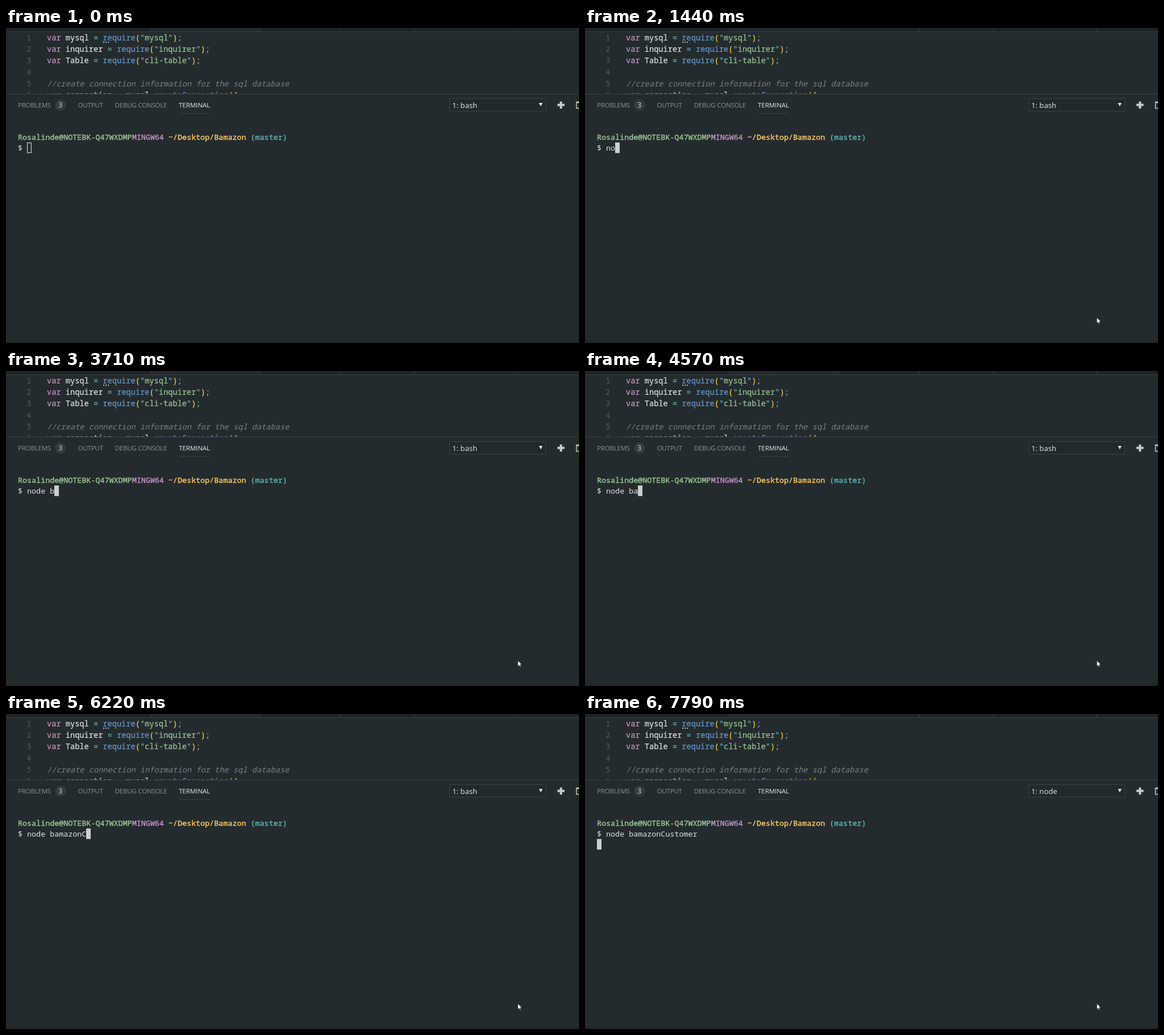
An HTML page that plays this animation: 1008x555 px, repeating every 8000 ms.

```html
<!DOCTYPE html>
<html lang="en">
<head>
<meta charset="utf-8">
<title>Terminal session</title>
<style>
  html, body { margin: 0; width: 100%; height: 100%; overflow: hidden; background: #242b2e; }
  svg { display: block; width: 1008px; height: 555px; }
  text { white-space: pre; }
  .code, .term { font-family: "Noto Sans Mono", "DejaVu Sans Mono", monospace; font-variant-ligatures: none; }
  .code { font-size: 13.67px; stroke-width: .2px; }
  .term { font-size: 13.39px; stroke-width: .4px; }
  .ui { font-family: "Open Sans", "Noto Sans", sans-serif; }
  .tab { font-size: 11.6px; letter-spacing: -.25px; fill: #899092; }
</style>
</head>
<body>
<svg viewBox="0 0 1008 555">
  <defs><clipPath id="pane"><rect y="7" width="1008" height="108.5"/></clipPath></defs>

  <rect width="1008" height="555" fill="#242b2e"/>
  <rect width="1008" height="6" fill="#1e2427"/>
  <rect x="254" width="193" height="6" fill="#242b2e"/>
  <path d="M254.5 0V6M446.5 0V6M588.5 0V6M718.5 0V6M900.5 0V6M0 6.5H1008" stroke="#363e42" fill="none"/>

  <g id="editor" class="code" clip-path="url(#pane)"></g>
  <g fill="#b4babb">
    <rect x="171" y="24" width="2" height="2"/>
    <rect x="175" y="24" width="2" height="2"/>
    <rect x="179" y="24" width="2" height="2"/>
  </g>

  <path d="M0 116.5H1008" stroke="#384044"/>
  <g class="ui tab">
    <text x="21" y="140">PROBLEMS</text>
    <text x="126.5" y="140">OUTPUT</text>
    <text x="191.5" y="140">DEBUG CONSOLE</text>
    <text x="304" y="140" style="fill:#e3e6e7;letter-spacing:-.1px">TERMINAL</text>
  </g>
  <circle cx="95.8" cy="135.7" r="9.6" fill="#363d40"/>
  <text class="ui" x="95.8" y="140" font-size="12" text-anchor="middle" fill="#d5d9da">3</text>
  <path d="M304 150.5H359" stroke="#394145"/>

  <rect x="780.5" y="124.5" width="169" height="22" fill="#22292c" stroke="#394145"/>
  <text id="shell" class="ui" x="785" y="141" font-size="13.1" fill="#e2e5e6"></text>
  <path d="M937.5 132H944L940.75 138Z" fill="#e2e5e6"/>
  <path d="M976.3 129.5V142M970 135.5H982.5" stroke="#c9cccd" stroke-width="4" fill="none"/>
  <path d="M1008 130.5H1003.5V141.5H1008" stroke="#c9cccd" stroke-width="1.4" fill="none"/>
  <path d="M1003 131H1008" stroke="#c9cccd" stroke-width="2.4"/>

  <g id="terminal" class="term"></g>
  <text id="command" class="term" x="21" y="215.6" fill="#dfe3e5"></text>
  <rect id="caret"/>
  <path id="mouse" d="M0 0V10L2.3 8L3.8 11.3L5.4 10.6L3.9 7.4L7 7.1Z" fill="#fff" stroke="#14181a" stroke-width=".6"/>
  <rect y="551" width="1008" height="4" fill="#20272a"/>
</svg>
<script>
const LOOP = 8000, LEFT = 21, CELL = 8.03;
const WHITE = "#dfe3e5", PURPLE = "#c594c5", TEAL = "#5fb3b3",
      BLUE = "#6699cc", GREEN = "#99c794", GOLD = "#fac863", BRACKET = "#ffd02e", GREY = "#778083";
const COMMAND = "node bamazonCustomer";

const $ = id => document.getElementById(id);

function el(parent, name, attrs, content = "") {
  const node = document.createElementNS("http://www.w3.org/2000/svg", name);
  for (const key in attrs) node.setAttribute(key, attrs[key]);
  node.textContent = content;
  return parent.appendChild(node);
}

// A thin stroke in the text colour gives the medium weight.
function textRuns(parent, x, y, runs) {
  const line = el(parent, "text", { x, y });
  for (const [str, fill, style = "normal"] of runs) {
    const stroke = style === "italic" ? "none" : fill;
    el(line, "tspan", { fill, stroke, "font-style": style }, str);
  }
}

const requireLine = (name, pkg) => [
  ["var ", PURPLE], [name, WHITE], [" = ", TEAL], ["require", BLUE], ["(", BRACKET],
  ['"', TEAL], [pkg, GREEN], ['"', TEAL], [")", BRACKET], [";", TEAL]
];

const lines = [
  requireLine("mysql", "mysql"),
  requireLine("inquirer", "inquirer"),
  requireLine("Table", "cli-table"),
  [],
  [["//create connection information for the sql database", GREY, "italic"]],
  [["var ", PURPLE], ["connection", WHITE], [" = ", TEAL], ["mysql", WHITE], [".", TEAL],
   ["createConnection", BLUE], ["({", BRACKET]]
];
lines.forEach((runs, i) => {
  const y = 21.6 + i * 20.35;
  el($("editor"), "text", { x: 44.5, y, "text-anchor": "end", fill: "#505a5e" }, i + 1);
  textRuns($("editor"), 72, y, runs);
});

textRuns($("terminal"), LEFT, 197.3, [
  ["Rosalinde@NOTEBK-Q47WXDMP", GREEN], ["MINGW64 ", PURPLE],
  ["~/Desktop/Bamazon ", GOLD], ["(master)", TEAL]
]);

// [time, characters typed]
const typing = [
  [0, 0], [1270, 1], [1440, 2], [1545, 3], [1650, 4], [1890, 5], [3710, 6], [4570, 7],
  [4820, 8], [5460, 11], [5830, 12], [6150, 13], [6360, 14], [6490, 15], [6780, 16],
  [6920, 17], [6980, 18], [7075, 19], [7170, 20]
];
// [time, x, y]
const pointer = [[0, -50, -50], [150, 929, 546], [210, 918, 530], [270, 907, 516], [330, 900.4, 510.2]];
const FOCUS = 740, ENTER = 7670, RUNNING = 7790;

const stepAt = (table, t) => table.findLast(step => step[0] <= t);

function setCaret(x, y, filled) {
  const inset = filled ? 0 : .6;
  const attrs = {
    x: x + inset, y: y + inset, width: 8 - 2 * inset, height: 18.6 - 2 * inset,
    fill: filled ? "#cccfd0" : "none", stroke: filled ? "none" : "#cccfd0", "stroke-width": 1.2
  };
  for (const key in attrs) $("caret").setAttribute(key, attrs[key]);
}

function draw(t) {
  const typed = stepAt(typing, t)[1];
  const [, mx, my] = stepAt(pointer, t);
  $("command").textContent = "$ " + COMMAND.slice(0, typed);
  $("shell").textContent = t < RUNNING ? "1: bash" : "1: node";
  $("mouse").setAttribute("transform", `translate(${mx} ${my})`);
  if (t < ENTER) setCaret(Math.floor(LEFT + (typed + 2) * CELL), 201.7, t >= FOCUS);
  else setCaret(LEFT, 220.2, true);
}

const start = performance.now();
function tick() {
  draw((performance.now() - start) % LOOP);
  requestAnimationFrame(tick);
}
tick();
</script>
</body>
</html>
```
